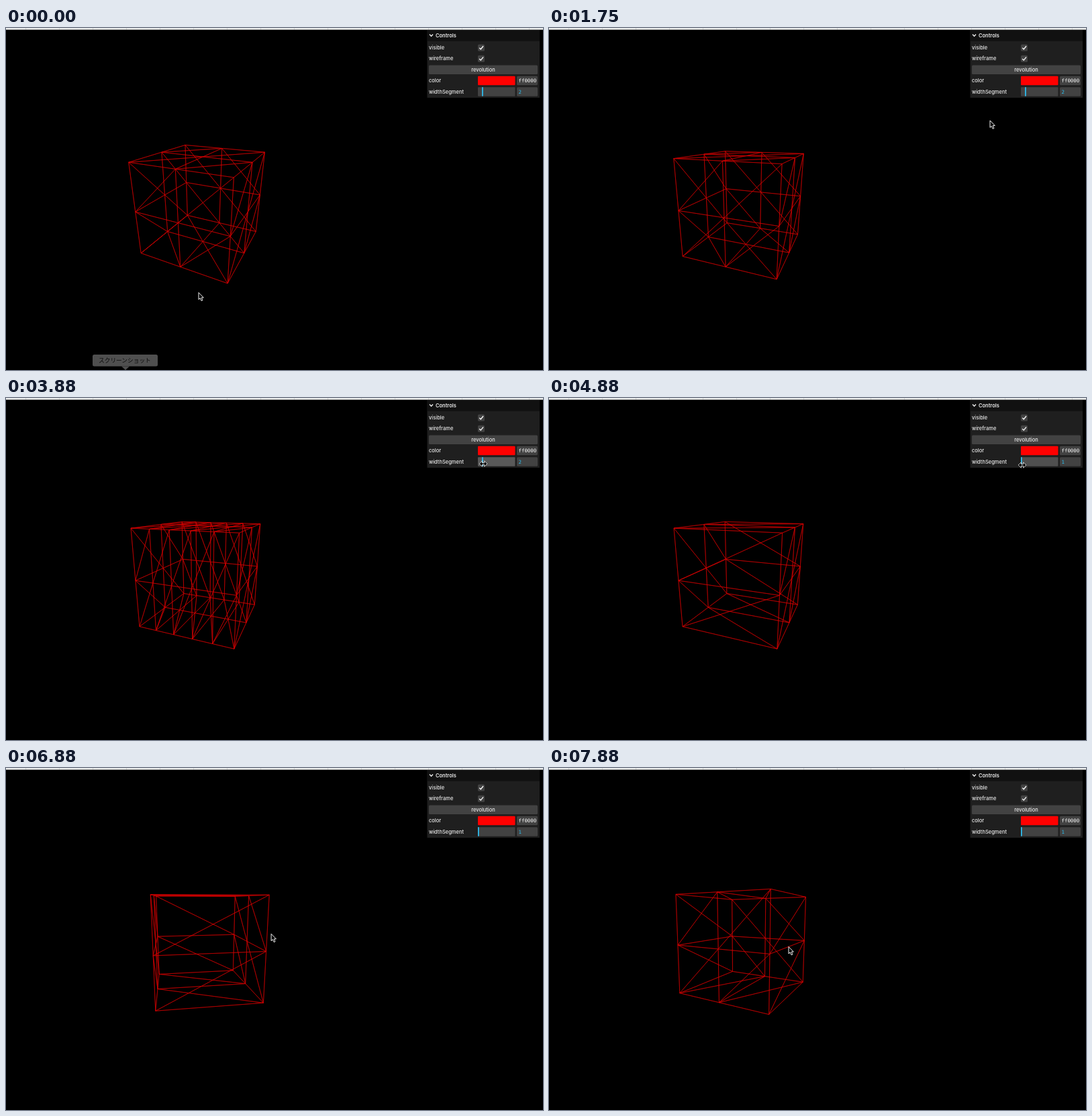
An HTML page that plays this animation: 800x510 px, repeating every 8 s.

```html
<!DOCTYPE html>
<html lang="en">
<head>
<meta charset="utf-8">
<title>Wireframe box</title>
<style>
  html, body { margin: 0; width: 100%; height: 100%; overflow: hidden; background: #000; }
  svg { display: block; width: 100vw; height: 100vh; }
  text { font: 500 7.5px Inter, "Open Sans", sans-serif; fill: #ebebeb; }
  .mono { font: 7.4px "DejaVu Sans Mono", "Noto Sans Mono", monospace; fill: #fff; }
  .widget { fill: #424242; }
</style>
</head>
<body>
<svg viewBox="0 0 800 510">
  <defs>
    <pattern id="tabs" x="29" width="50" height="3" patternUnits="userSpaceOnUse">
      <path d="M0 0H50V3H0Z" fill="#e8eaea"/><path d="M0 0H1V3H0Z" fill="#d2d4d4"/>
    </pattern>
  </defs>
  <rect width="800" height="510"/>
  <rect width="800" height="2.6" fill="url(#tabs)"/>

  <path id="wire" fill="none" stroke="#d00000" stroke-width=".6" stroke-linejoin="bevel"/>

  <g id="tip">
    <rect x="129" y="487" width="97" height="17.5" rx="2.5" fill="#4f4f4f"/>
    <path d="M172 504.5H184L178 510Z" fill="#4f4f4f"/>
    <text x="138" y="499" style="font:8.7px 'Noto Sans CJK JP','Noto Sans CJK',sans-serif;fill:#0c0c0c">スクリーンショット</text>
  </g>

  <rect x="627.5" y="3" width="167.5" height="101" fill="#1f1f1f"/>
  <rect x="627.5" y="3" width="167.5" height="16.5" fill="#111"/>
  <path d="M631 9.6L633.5 12.2L636 9.6" fill="none" stroke="#ebebeb" stroke-width="1.5"/>
  <text x="640" y="13.7" style="font-weight:600">Controls</text>
  <text x="630" y="32">visible</text>
  <text x="630" y="48.3">wireframe</text>
  <text x="630" y="81">color</text>
  <text x="630" y="97.6">widthSegment</text>
  <g id="checks">
    <rect class="widget" x="703" y="24.4" width="10" height="10" rx="1.5"/>
    <path d="M705.2 29.6L707.2 31.7L711 27" fill="none" stroke="#fff" stroke-width="1.3"/>
  </g>
  <use href="#checks" y="16.4"/>
  <rect class="widget" x="630" y="55.4" width="162" height="13.6" rx="1.5"/>
  <text x="711" y="64.8" text-anchor="middle">revolution</text>
  <rect x="703" y="71.8" width="55.5" height="13.5" rx="1" fill="#f00"/>
  <rect class="widget" x="761" y="71.8" width="31" height="13.5" rx="1.5"/>
  <text class="mono" x="763.5" y="81.2">ff0000</text>
  <rect id="slider" x="703" y="88.2" width="55.5" height="13.5" rx="1"/>
  <rect id="handle" y="88.2" width="1.6" height="13.5" fill="#2cc9ff"/>
  <rect class="widget" x="761" y="88.2" width="31" height="13.5" rx="1.5"/>
  <text class="mono" id="value" x="763.5" y="97.8" style="fill:#2cc0f2"></text>

  <g stroke="#fff" stroke-linejoin="round">
    <path id="arrow" stroke-width=".95" d="M0 0V10.4L2.3 8.3L4.1 12.3L5.9 11.5L4.2 7.6H7.3Z"/>
    <path id="resize" stroke-width=".8" d="M-5.8 0L-1.6 -4.2V-1.2H1.6V-4.2L5.8 0L1.6 4.2V1.2H-1.6V4.2Z"/>
  </g>
</svg>
<script>
const $ = id => document.getElementById(id);
const LOOP = 8000, STEP = 125;
const CENTER = [293.3, 260.5], FOCAL = 336.5, DISTANCE = Math.sqrt(6);
const TRACK = { x: 703, width: 55, max: 10 };
const HOVER = [2250, 5125], RELEASES = [3000, 4750];

// Key points of the pointer: [time, x, y]
const pointer = [
  [0, 287, 394.5], [875, 757, 95], [1250, 651, 150], [1750, 657, 138], [2250, 710, 95],
  [2625, 733, 95], [4250, 704.5, 99], [4875, 705, 100],
  [6125, 352, 252], [7500, 431, 243.5], [7875, 357, 266.5]
];
// Turn made by the last drag: [time, yaw, pitch]
const drag = [[0, 0, 0], [6125, 0, 0], [6375, -10.4, -1.9], [7375, -52.4, -8.8], [7875, -82.8, -8.8]];

const clamp = (v, lo, hi) => Math.min(hi, Math.max(lo, v));

function tween(keys, t) {
  const i = keys.findIndex(k => k[0] > t);
  if (i < 0) return keys[keys.length - 1].slice(1);
  const a = keys[i - 1], b = keys[i], f = (t - a[0]) / (b[0] - a[0]);
  return a.slice(1).map((v, n) => v + (b[n + 1] - v) * f);
}

// A short damped nudge, then the long drag
function orbit(t) {
  const nudge = 1 - Math.exp(-Math.max(0, t - 1125) / 240);
  const [yaw, pitch] = tween(drag, t);
  return [26.57 - 4.17 * nudge + yaw, 24.1 - 7.8 * nudge + pitch];
}

// The slider follows the pointer until the last release
function sliderValue(t) {
  const [x] = tween(pointer, clamp(t, HOVER[0], RELEASES[1]));
  return clamp(Math.round(1 + (x - TRACK.x) / TRACK.width * (TRACK.max - 1)), 1, TRACK.max);
}

// The box is rebuilt only when the slider is let go
function segments(t) {
  const released = RELEASES.filter(r => r <= t).pop() || 0;
  return sliderValue(released);
}

function projector(yaw, pitch) {
  const r = Math.PI / 180;
  const sy = Math.sin(yaw * r), cy = Math.cos(yaw * r);
  const sp = Math.sin(pitch * r), cp = Math.cos(pitch * r);
  return ([x, y, z]) => {
    const side = x * cy - z * sy, near = x * sy + z * cy;
    const k = FOCAL / (DISTANCE - near * cp - y * sp);
    return (CENTER[0] + side * k).toFixed(2) + ' ' + (CENTER[1] - (y * cp - near * sp) * k).toFixed(2);
  };
}

// Two triangles per grid cell on one side of the unit box
function side(project, u, v, w, du, dv, dw, nu) {
  const nv = 2;
  const at = (i, j) => {
    const p = [];
    p[u] = (i / nu - .5) * du;
    p[v] = (j / nv - .5) * dv;
    p[w] = dw / 2;
    return project(p);
  };
  let d = '';
  for (let i = 0; i < nu; i++) for (let j = 0; j < nv; j++) {
    const b = at(i, j + 1), e = at(i + 1, j);
    d += `M${at(i, j)}L${b}L${e}ZM${b}L${at(i + 1, j + 1)}L${e}Z`;
  }
  return d;
}

function box(project, n) {
  let d = '';
  for (const s of [1, -1]) {
    d += side(project, 2, 1, 0, -s, -1, s, 2);
    d += side(project, 0, 2, 1, 1, s, s, n);
    d += side(project, 0, 1, 2, s, -1, s, n);
  }
  return d;
}

function draw(now) {
  const t = Math.floor(now % LOOP / STEP) * STEP;
  const show = (id, on) => $(id).setAttribute('visibility', on ? 'visible' : 'hidden');

  $('wire').setAttribute('d', box(projector(...orbit(t)), segments(t)));
  show('tip', t < 250);

  const value = sliderValue(t);
  $('value').textContent = value;
  $('handle').setAttribute('x', TRACK.x + (value - 1) / (TRACK.max - 1) * TRACK.width);
  const over = t >= HOVER[0] && t < HOVER[1];
  const held = over && t < RELEASES[1];
  $('slider').setAttribute('fill', held ? '#595959' : over ? '#4f4f4f' : '#424242');

  const [x, y] = tween(pointer, t);
  for (const id of ['arrow', 'resize']) $(id).setAttribute('transform', `translate(${x} ${y})`);
  show('arrow', !over);
  show('resize', over);
}

const start = performance.now();
function loop() {
  draw(performance.now() - start);
  requestAnimationFrame(loop);
}
loop();
</script>
</body>
</html>
```
